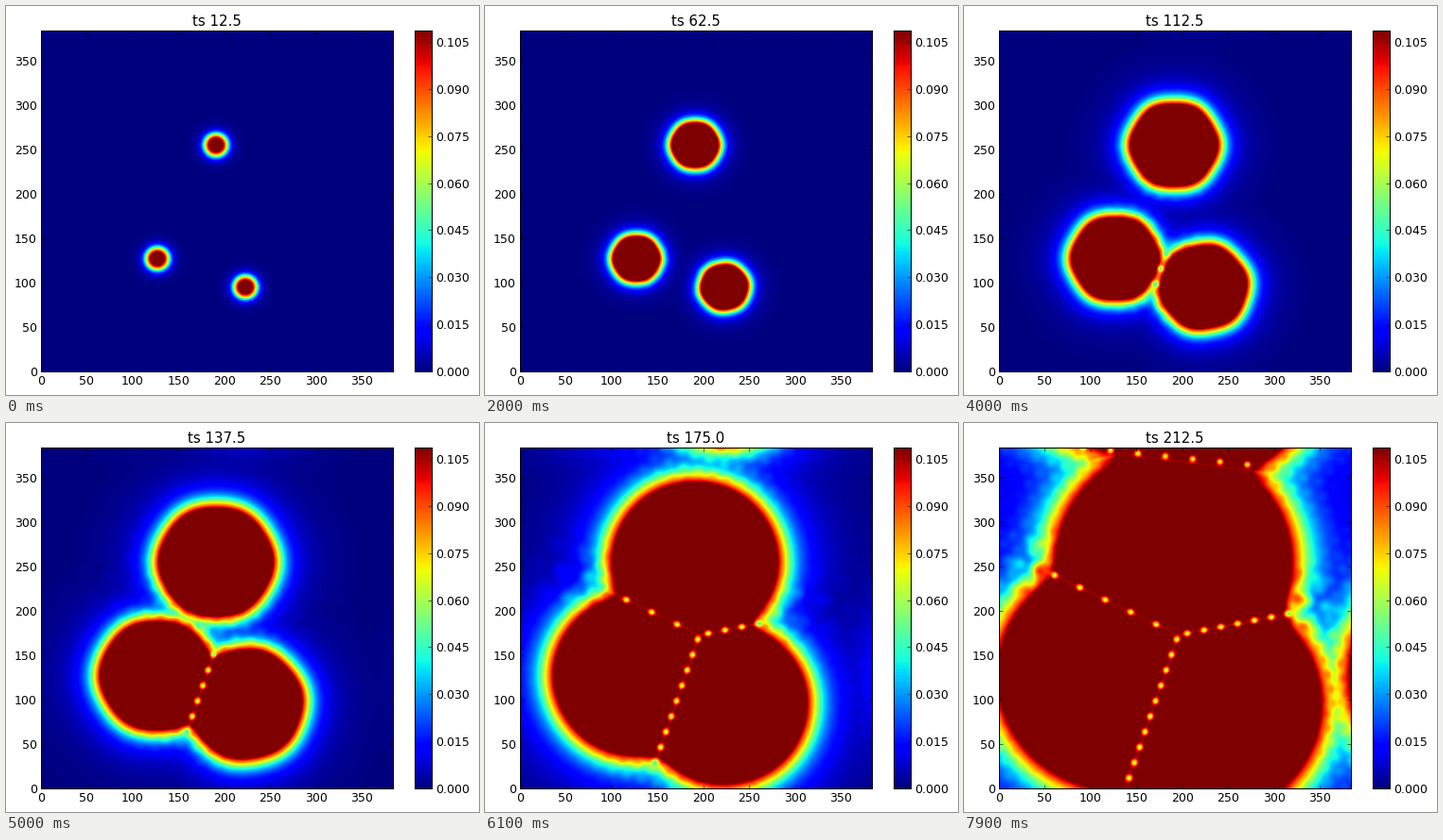
A matplotlib script for the animation above (8000 ms loop, 500 by 412 pixels).

```python
import numpy as np
import matplotlib.pyplot as plt
from matplotlib.animation import FuncAnimation

W, H, DPI = 500, 412, 100
N = 384                      # periodic domain size
VMAX = 0.1086
STEP = 12.5                  # simulated time per picture
FRAMES, INTERVAL = 80, 100

TOP, LEFT, RIGHT = np.array([(191, 255), (127, 127), (223, 95)])
X, Y = np.meshgrid(np.arange(N) + 0.5, np.arange(N) + 0.5)
X, Y = X.astype(np.float32), Y.astype(np.float32)


def polar_stack():
    """Distance and six-fold angle term for every seed and its images."""
    dist, six = [], []
    for (sx, sy), turn in zip((TOP, LEFT, RIGHT), (0, 0, 0.2)):
        for ox in (-N, 0, N):
            for oy in (-N, 0, N):
                dx, dy = X - sx - ox, Y - sy - oy
                dist.append(np.hypot(dx, dy))
                six.append(np.cos(6 * (np.arctan2(dy, dx) - turn)))
    return np.array(dist), np.array(six)


def blob(cx, cy, size):
    return np.exp(-((X - cx) ** 2 + (Y - cy) ** 2) / (2 * size ** 2))


def smooth(v, lo, hi):
    t = np.clip((v - lo) / (hi - lo), 0, 1)
    return t * t * (3 - 2 * t)


def hex_waves(cx, cy, spacing):
    k = 4 * np.pi / (np.sqrt(3) * spacing)
    angles = 0.25 + np.arange(3) * np.pi / 3
    return sum(np.cos(k * ((X - cx) * np.cos(a) + (Y - cy) * np.sin(a)))
               for a in angles) / 3


def bumps():
    """Large lattice cells in the two open grooves, faint ones elsewhere."""
    total = 0.12 * hex_waves(180, 118, 17)
    for cx, cy in ((45, 246), (331, 212)):
        total = total + 0.45 * blob(cx, cy, 32) * hex_waves(cx, cy, 31)
    return total


def row(start, across, first, spacing, count):
    """Evenly spaced defects on a seam, at right angles to `across`."""
    along = np.array([across[1], -across[0]]) / np.hypot(*across)
    return [start + along * (first + spacing * k) for k in range(count)]


def defect_map():
    # The three seams meet where all seeds are equally far away
    sides = np.array([LEFT - TOP, RIGHT - TOP])
    meet = TOP + np.linalg.solve(sides, (sides ** 2).sum(1) / 2)
    spots = (row(meet, LEFT - RIGHT, 5, 18.3, 10)[::-1]
             if (LEFT - RIGHT)[0] > 0 else row(meet, RIGHT - LEFT, 5, 18.3, 10))
    spots += row(meet, TOP - RIGHT, 10, 18.7, 8)
    spots += row(meet, LEFT - TOP, 27, 31, 5)
    spots += row(np.array([92, 384]), (24, 224), 0, 30, 7)
    return np.max([blob(x, y, 2.5) for x, y in spots], axis=0)


DIST, SIX = polar_stack()
near = np.partition(DIST, 1, axis=0)
GAP = near[1] - near[0]
BUMPS = bumps() * np.exp(-(GAP / 45) ** 2)
SEAM = np.exp(-(GAP / 4) ** 2)
DOTS = defect_map()


def field(n):
    """Normalised density for picture n (1, 2, ...)."""
    radius = 7.7 + 3.79 * n + 0.014 * n ** 3
    width = 2.6 + 0.028 * n ** 2
    peak = 1.4 - 0.3 / n
    halo, reach = 0.08 + 0.016 * n, 6 + 0.12 * n ** 2
    facet = 0.018 * np.exp(-((n - 8) / 4) ** 2)
    core = radius - width * np.log(peak / (0.64 - halo) - 1)

    cubes = np.zeros_like(X)
    for r, six in zip(DIST, SIX):
        r = r - radius * facet * six
        u = peak / (1 + np.exp(np.clip((r - core) / width, -40, 40)))
        u += halo * np.exp(-np.maximum(r - radius, 0) / reach)
        cubes += u * u * u
    u = np.cbrt(cubes)

    u = u * (1 + BUMPS * (1 - smooth(u, 0.55, 1.05)))
    solid = smooth(u, 0.35, 0.8)
    u = np.minimum(u, 1.05)
    return u * (1 - 0.07 * SEAM * solid) * (1 - 0.42 * DOTS * solid)


def add_axes(left, top, w, h):
    ax = fig.add_axes([left / W, 1 - (top + h) / H, w / W, h / H])
    for spine in ax.spines.values():
        spine.set_linewidth(0.75)
    ax.tick_params(direction="in", length=2.9, width=0.4, pad=3, labelsize=9)
    return ax


plt.rcParams["font.family"] = "DejaVu Sans"
fig = plt.figure(figsize=(W / DPI, H / DPI), dpi=DPI, facecolor="white")

ax = add_axes(37, 26, 372, 361)
ax.tick_params(top=True, right=True)
pictures = [field(n) for n in range(1, (FRAMES - 1) * 3 // 14 + 2)]
image = ax.imshow(pictures[0], cmap="jet", vmin=0, vmax=1, origin="lower",
                  extent=(0, N, 0, N), aspect="auto", interpolation="bilinear")
ax.set_xticks(range(0, N, 50))
ax.set_yticks(range(0, N, 50))
title = ax.set_title("", fontsize=10.8, pad=3.6)

bar = add_axes(432, 26, 18, 361)
bar.imshow(np.linspace(0, 1, 256)[:, None], cmap="jet", origin="lower",
           extent=(0, 1, 0, VMAX), aspect="auto")
bar.set_xticks([])
bar.yaxis.tick_right()
bar.set_yticks(np.arange(8) * 0.015)
bar.yaxis.set_major_formatter("{x:.3f}")


def update(i):
    k = i * 3 // 14          # each picture is held for 7/15 s
    image.set_data(pictures[k])
    title.set_text(f"ts {STEP * (k + 1):.1f}")
    return image, title


anim = FuncAnimation(fig, update, frames=FRAMES, interval=INTERVAL,
                     repeat=True, repeat_delay=0, blit=False)
plt.show()
```
